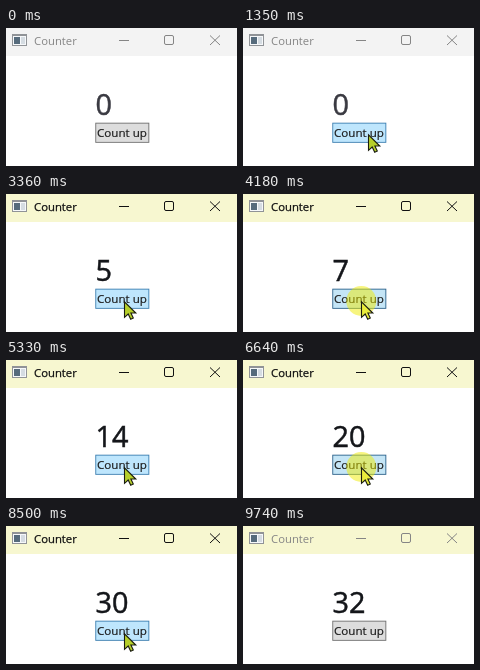
Write an HTML page with a canvas that moves like this. It is 231 px wide and 138 px high and loops after 9.82 s.

```html
<!DOCTYPE html>
<html lang="en">
<head>
<meta charset="utf-8">
<title>Counter</title>
<style>
html, body { margin: 0; width: 231px; height: 138px; overflow: hidden; background: #fff; }
canvas { display: block; }
</style>
</head>
<body>
<canvas id="stage" width="231" height="138"></canvas>
<script>
const ctx = document.getElementById('stage').getContext('2d');
const FONT = '"Open Sans", "Noto Sans", sans-serif';
const LOOP = 9820, STEP = 68, HOLD = 75;
const ENTER = 670, HOVER = 810, ACTIVATE = 1810, LEAVE = 8852, EXIT = 9130, DEACTIVATE = 9740;

// Clicking rhythm: [count, time], evenly spaced in between
const rhythm = [[0, 0], [1, 1950], [2, 2420], [3, 2820], [5, 3360], [7, 4050], [14, 5330], [21, 6710], [27, 7752], [32, 8850]];

function clicksAt(t) {
  const i = rhythm.findIndex(([, time]) => time > t);
  if (i < 0) return rhythm[rhythm.length - 1][0];
  const [n0, t0] = rhythm[i - 1], [n1, t1] = rhythm[i];
  return Math.floor(n0 + (n1 - n0) * (t - t0) / (t1 - t0) + 1e-6);
}

function move(t, from, to) {
  const steps = Math.round((to - from) / STEP);
  const k = Math.floor((t - from) / (to - from) * steps + 0.05) / steps;
  return Math.max(0, Math.min(1, k));
}

function pointerAt(t) {
  const enter = move(t, ENTER, HOVER);
  const approach = move(t, 1002, 1410);
  const settle = move(t, 1672, ACTIVATE);
  const leave = move(t, LEAVE, EXIT);
  return [
    Math.round(180 - 47 * enter - 10 * approach - 5 * settle + 71 * leave),
    Math.round(88 + 11 * enter + 8 * approach + 31 * leave)
  ];
}

function rect(x, y, w, h, color) {
  ctx.fillStyle = color;
  ctx.fillRect(x, y, w, h);
}

function text(s, x, y, size, color, weight = 0) {
  ctx.font = size + 'px ' + FONT;
  ctx.fillStyle = ctx.strokeStyle = color;
  ctx.fillText(s, x, y);
  if (weight) {
    ctx.lineWidth = weight;
    ctx.strokeText(s, x, y);
  }
}

function line(x0, y0, x1, y1) {
  ctx.beginPath();
  ctx.moveTo(x0, y0);
  ctx.lineTo(x1, y1);
  ctx.stroke();
}

function drawTitleBar(t) {
  const active = t >= ACTIVATE && t < DEACTIVATE;
  const ink = active ? '#111' : '#858585';
  rect(0, 0, 231, 28, t < ACTIVATE ? '#f3f3f3' : '#f7f7d0');

  rect(6, 6, 15, 12, '#909397');
  rect(7, 8, 13, 9, '#f6f8fa');
  rect(8, 9, 6, 7, '#566b7c');
  rect(15, 9, 4, 7, '#d5dce2');

  text('Counter', 28, 17, 11.3, ink, active ? 0.25 : 0);
  ctx.strokeStyle = ink;
  ctx.lineWidth = 1;
  line(113, 12.5, 123, 12.5);
  ctx.beginPath();
  ctx.roundRect(158.5, 7.5, 9, 9, 1.5);
  ctx.stroke();
  line(204, 7.5, 214, 17);
  line(214, 7.5, 204, 17);
}

function drawButton(hover, pressed) {
  rect(89.3, 94.7, 54, 20.1, pressed ? '#2c628b' : hover ? '#3c7fb1' : '#707070');
  rect(90.2, 95.6, 52.2, 18.3, pressed ? '#c4e5f6' : hover ? '#bee6fd' : '#dddddd');
  text('Count up', 91, 109.4, 11.6, '#1c1c1c', 0.2);
}

function drawPointer([x, y], pressed) {
  if (pressed) {
    ctx.fillStyle = 'rgba(240, 236, 0, 0.5)';
    ctx.beginPath();
    ctx.arc(x + 0.3, y, 15, 0, Math.PI * 2);
    ctx.fill();
  }
  ctx.save();
  ctx.translate(x + 0.5, y + 0.8);
  ctx.beginPath();
  [[0, 0], [0, 15.5], [3.7, 12.2], [6.2, 17.5], [8.8, 16.3], [6.4, 11.2], [11.3, 11.2]]
    .forEach(p => ctx.lineTo(...p));
  ctx.closePath();
  ctx.fillStyle = pressed ? '#e9ec3c' : '#b6cf2a';
  ctx.strokeStyle = '#1a1c10';
  ctx.lineWidth = 1.1;
  ctx.fill();
  ctx.stroke();
  ctx.restore();
}

function draw(t) {
  const count = clicksAt(t);
  const pressed = clicksAt(t + HOLD) > count;

  rect(0, 0, 231, 138, '#fff');
  drawTitleBar(t);
  text(count, 89.6, 87.3, 28.8, t < ACTIVATE ? '#3a3a42' : '#14161a', 0.5);
  drawButton(t >= HOVER && t < LEAVE + STEP, pressed);
  if (t >= ENTER && t < EXIT) drawPointer(pointerAt(t), pressed);
}

const start = performance.now();
function tick() {
  draw((performance.now() - start) % LOOP);
  requestAnimationFrame(tick);
}
tick();
</script>
</body>
</html>
```
